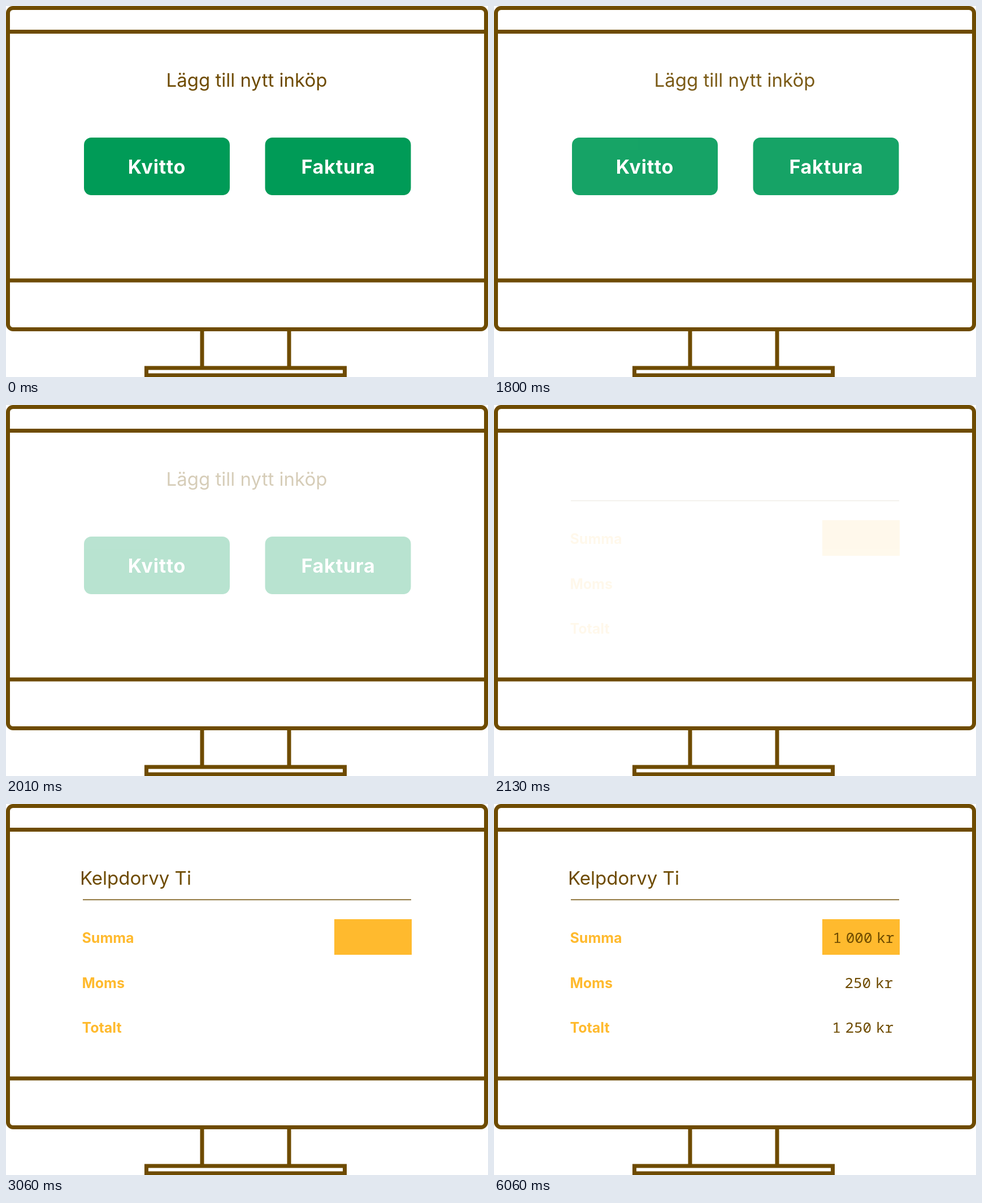
An HTML page for the animation above (8000 ms loop, 853 by 657 pixels).

```html
<!DOCTYPE html>
<html lang="sv">
<head>
<meta charset="utf-8">
<title>Nytt inköp</title>
<style>
  html, body { margin: 0; width: 100%; height: 100%; overflow: hidden; background: #fff; }
  svg { display: block; width: 100%; height: 100%; font-family: Inter, "Noto Sans", sans-serif; }
  .line { fill: none; stroke: #6e4b00; stroke-width: 7; }
  .title { font-size: 33px; fill: #6e4b00; }
  .button { font-size: 34px; font-weight: 700; letter-spacing: .8px; fill: #fff; text-anchor: middle; }
  .label { font-size: 25px; font-weight: 700; fill: #ffba2e; }
  .value { font: 26px "Noto Sans Mono", monospace; fill: #6e4b00; word-spacing: -8px; }
  .right { text-anchor: end; }
</style>
</head>
<body>
<svg viewBox="0 0 853 657">
  <g class="line">
    <rect x="3.5" y="3.5" width="846" height="569" rx="9"/>
    <path d="M3 45.5H850M3 486H850M347 573V641M501 573V641"/>
    <rect x="248.5" y="641" width="351" height="13"/>
  </g>

  <g id="choice">
    <text class="title" x="426" y="143" text-anchor="middle">Lägg till nytt inköp</text>
    <rect id="receipt" x="138" y="233" width="258" height="102" rx="13" fill="#009b57"/>
    <rect x="458.5" y="233" width="258" height="102" rx="13" fill="#009b57"/>
    <text class="button" x="267" y="297">Kvitto</text>
    <text class="button" x="588" y="296.5">Faktura</text>
  </g>

  <g id="form">
    <path d="M136 169.5H717" stroke="#6e4b00" stroke-width="1.4"/>
    <rect x="581" y="204" width="137" height="63" fill="#ffba2e"/>
    <text class="label" x="134.5" y="246">Summa</text>
    <text class="label" x="134.5" y="325.5">Moms</text>
    <text class="label" x="134.5" y="405">Totalt</text>
  </g>

  <text id="item" class="title" x="131" y="143"></text>
  <text id="sum" class="value" x="599.5" y="246"></text>
  <text id="vat" class="value right" x="706" y="325.5"></text>
  <text id="total" class="value right" x="707" y="404.5"></text>
</svg>
<script>
  const LOOP = 8000, STEP = 30, FADE_START = 1800, FADE_STEPS = 11;
  const ITEM = "Kelpdorvy Ti";
  const $ = id => document.getElementById(id);
  const clamp = v => Math.max(0, Math.min(1, v));

  // Number of intervals begun since start, 0 before it.
  const ticks = (t, start, every) => t < start ? 0 : Math.floor((t - start) / every) + 1;

  const money = n => {
    const [whole, cents] = n.toFixed(2).split(".");
    const grouped = whole.replace(/\B(?=(\d{3})+$)/g, " ");
    return grouped + (cents === "00" ? "" : "," + cents) + " kr";
  };

  // The decimal comma sits in a narrow slot.
  const tight = s => s.replace(/,(\d)/, '<tspan dx="-4">,</tspan><tspan dx="-4">$1</tspan>');

  const cache = {};
  function write(id, text) {
    if (cache[id] === text) return;
    cache[id] = text;
    $(id).innerHTML = tight(text);
  }

  function draw(t) {
    const fade = ticks(t, FADE_START, STEP) / FADE_STEPS;
    $("choice").setAttribute("opacity", clamp(1 - fade));
    $("form").setAttribute("opacity", clamp(fade - 1));
    $("receipt").setAttribute("fill", t >= 500 && t < 1000 ? "#007f47" : "#009b57");

    write("item", ITEM.slice(0, 3 * ticks(t, 2460, 200)));

    const digits = Math.min(4, ticks(t, 4560, 500));
    const sum = digits ? 10 ** (digits - 1) : 0;
    write("sum", digits === 4 ? money(sum) : sum ? String(sum) : "");
    write("vat", sum ? money(sum * .25) : "");
    write("total", sum ? money(sum * 1.25) : "");
  }

  const start = performance.now();
  function tick() {
    draw((performance.now() - start) % LOOP);
    requestAnimationFrame(tick);
  }
  tick();
</script>
</body>
</html>
```
